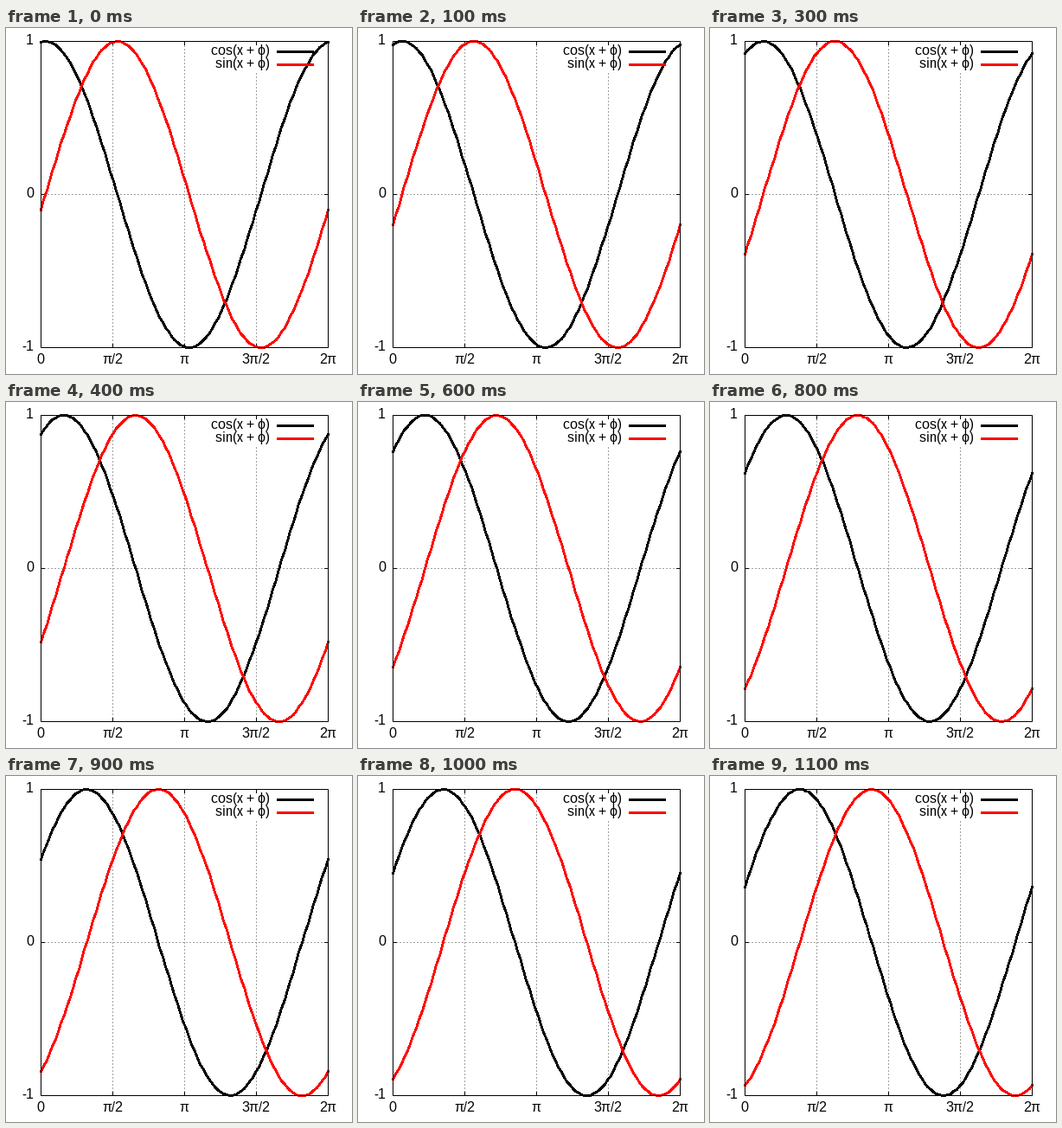
A matplotlib script that plays this animation: 400x400 px, repeating every 1.2 s.

```python
import numpy as np
import matplotlib.pyplot as plt
from matplotlib.animation import FuncAnimation

SIZE, DPI = 400, 100
PX = 72 / DPI  # points per pixel
LEFT, RIGHT, TOP, BOTTOM = 40, 372, 15, 369
MID = (TOP + BOTTOM) / 2
XTICKS = np.linspace(LEFT, RIGHT, 5)
STEPS = 12

plt.rcParams.update({
    "font.family": ["Liberation Sans", "DejaVu Sans"],
    "text.hinting": "default",
    "text.hinting_factor": 1,
    "path.simplify": False,
})

fig = plt.figure(figsize=(SIZE / DPI, SIZE / DPI), dpi=DPI, facecolor="white")
ax = fig.add_axes([0, 0, 1, 1])
ax.set(xlim=(0, SIZE), ylim=(SIZE, 0))
ax.axis("off")


def line(xs, ys, color="black", width=1, **kw):
    """Line through pixel centres."""
    kw.setdefault("solid_capstyle", "projecting")
    return ax.plot(np.add(xs, 0.5), np.add(ys, 0.5), color=color, lw=width * PX,
                   snap=False, solid_joinstyle="miter", **kw)[0]


def label(x, y, text, ha):
    ax.text(x, y, text, ha=ha, va="baseline", fontsize=16 * PX)


def wave(fn, phase):
    y = MID - fn(x - phase) * (BOTTOM - TOP) / 2
    return np.round(y) + 0.5


# Grid, interrupted behind the legend
grid = dict(color="#a0a0a0", dashes=(2, 2), dash_capstyle="butt", zorder=1)
line([LEFT - 0.5, RIGHT], [MID, MID], **grid)
for gx in XTICKS[1:-1]:
    line([gx, gx], [BOTTOM + 0.5, 50 if gx > 230 else TOP], **grid)

# Frame and inward ticks
line([LEFT, RIGHT, RIGHT, LEFT, LEFT], [TOP, TOP, BOTTOM, BOTTOM, TOP], zorder=4)
for gx in XTICKS[1:-1]:
    line([gx, gx], [TOP, TOP + 4], zorder=1.5)
    line([gx, gx], [BOTTOM, BOTTOM - 4], zorder=1.5)
line([LEFT, LEFT + 4], [MID, MID], zorder=1.5)
line([RIGHT, RIGHT - 4], [MID, MID], zorder=1.5)

for gx, text in zip(XTICKS, ["0", "π/2", "π", "3π/2", "2π"]):
    label(gx, 388, text, "center")
for gy, text in zip([TOP, MID, BOTTOM], ["1", "0", "-1"]):
    label(32, gy + 4, text, "right")

# Curves with their legend rows
x = np.linspace(0, 2 * np.pi, 100)
px = np.round(LEFT + x / (2 * np.pi) * (RIGHT - LEFT))
curves = []
for i, (fn, name, color) in enumerate([(np.cos, "cos", "black"), (np.sin, "sin", "red")]):
    row = 27 + 15 * i
    # Without antialiasing every touched pixel is filled, so 1.7 shows as 3
    curve = line(px, px, color, 1.7, zorder=2 + i, antialiased=False)
    line([312.5, 355.5], [row, row], color, 3, zorder=2.5 + i, solid_capstyle="butt")
    label(305, row + 4, f"{name}(x + ϕ)", "right")
    curves.append((curve, fn))


def update(k):
    for curve, fn in curves:
        curve.set_ydata(wave(fn, 0.1 * (k + 1)))
    return [curve for curve, _ in curves]


anim = FuncAnimation(fig, update, frames=STEPS, interval=100, repeat=True,
                     repeat_delay=0, blit=False)
plt.show()
```
